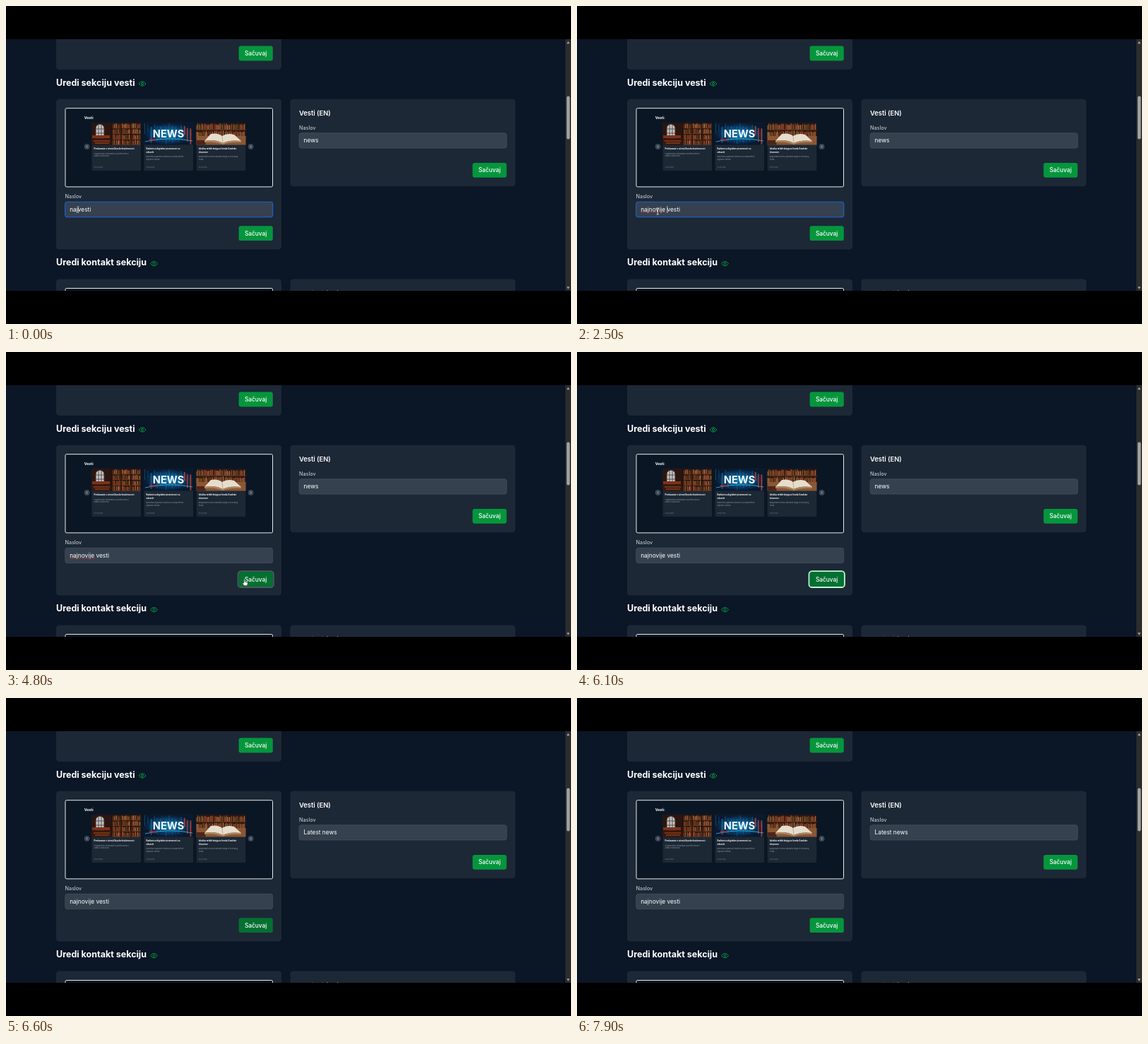
These frames come from a looping animation (800 px wide and 450 px high, 8000 ms). An HTML page:

```html
<!DOCTYPE html>
<html lang="sr">
<head>
<meta charset="utf-8">
<title>Uredi sekciju vesti</title>
<style>
html, body { margin: 0; width: 100%; height: 100%; overflow: hidden; background: #000; }
svg { display: block; width: 100%; height: 100%; font-family: Inter, sans-serif; }
.dark { --page: #0b1626; --card: #1d2836; --field: #35414f; --line: #4b5766; --ink: #fff; --label: #d5d9df; --frame: #e8eaed; }
.light { --page: #ecf3f1; --card: #fbfdfd; --field: #fafcfc; --line: #cdd3d5; --ink: #17202f; --label: #4a5361; --frame: none; }
.page { fill: var(--page); }
.card { fill: var(--card); }
.field { fill: var(--field); stroke: var(--line); stroke-width: .6; }
.ink { fill: var(--ink); }
.label { fill: var(--label); font-size: 7.29px; }
.h2 { fill: var(--ink); font-size: 12.5px; font-weight: 700; }
.h3 { fill: var(--ink); font-size: 9.375px; font-weight: 600; }
.value { fill: var(--ink); font-size: 8.333px; }
.btn { fill: #05963d; }
.btn-text { fill: #fff; font-size: 8.333px; font-weight: 500; text-anchor: middle; }
.shot { fill: #0b1625; stroke: var(--frame); stroke-width: 1; }
.eye { fill: none; stroke: #079540; stroke-width: 1; }
</style>
</head>
<body>
<svg id="stage" viewBox="0 0 800 450" preserveAspectRatio="none"></svg>
<script>
const LOOP = 8000;
const stage = document.getElementById('stage');

const rect = (x, y, w, h, r, attrs = '') =>
  `<rect x="${x}" y="${y}" width="${w}" height="${h}" rx="${r}" ${attrs}/>`;
const text = (x, y, str, attrs = '') => `<text x="${x}" y="${y}" ${attrs}>${str}</text>`;
const path = (d, attrs) => `<path d="${d}" ${attrs}/>`;

function random(seed) {
  return () => (seed = (seed * 16807) % 2147483647) / 2147483647;
}

function button(x, y, id = '') {
  return rect(x, y, 48.2, 20.8, 3.2, `class="btn" ${id && `id="${id}"`}`) +
    text(x + 24.1, y + 13.45, 'Sačuvaj', 'class="btn-text"');
}

function field(x, y, value, id) {
  return rect(x, y, 294, 21.4, 3.4, `class="field" id="${id}Box"`) +
    text(x + 6.5, y + 13.5, value, `class="value" id="${id}"`);
}

function eye(x, y) {
  return `<g class="eye" transform="translate(${x} ${y})">` +
    path('M-5 0Q-2.8 -3.2 0 -3.2T5 0Q2.8 3.2 0 3.2T-5 0Z', '') + '<circle r="1.5"/></g>';
}

// Rows of book spines filling a box
function books(x, y, w, h, rows, seed) {
  const rnd = random(seed), step = h / rows;
  let out = rect(x, y, w, h, 0, 'fill="#2a160d"');
  for (let row = 0; row < rows; row++) {
    for (let bx = x; bx < x + w - 1; bx += 1.5) {
      const tall = step * (.6 + rnd() * .25);
      out += rect(bx, y + (row + 1) * step - tall - .7, 1.2, tall, 0,
        `fill="hsl(${8 + rnd() * 26} ${35 + rnd() * 30}% ${18 + rnd() * 30}%)"`);
    }
    out += rect(x, y + (row + 1) * step - .7, w, .7, 0, 'fill="#7d4a29"');
  }
  return out;
}

function hall() {
  const arch = (x, w, top) => path(
    `M${x} 187V${top + 6}Q${x} ${top + 1} ${x + w / 2} ${top}Q${x + w} ${top + 1} ${x + w} ${top + 6}V187Z`,
    'fill="#bcc5cb" stroke="#512913" stroke-width="1"');
  return rect(121.5, 165.5, 69, 31, 0, 'fill="#2b1510"') + arch(127, 12, 167) +
    path('M131 168V187M135 168V187M127 174H139M127 180H139', 'stroke="#4c3429" stroke-width=".8"') +
    rect(122, 183, 25, 4, 0, 'fill="#7e3218"') +
    rect(121.5, 188, 28, 8.5, 0, 'fill="#39180f"') +
    path('M124 191H147M126 194H146', 'stroke="#b65b22" stroke-width=".9"') +
    books(150, 165.5, 40.5, 31, 4, 71) +
    path('M150 165.5V196.5M163 165.5V196.5M177 165.5V196.5', 'stroke="#1d0e09" stroke-width="1.3"');
}

function studio() {
  const rnd = random(23);
  let out = rect(195.5, 165.5, 69.5, 31, 0, 'fill="url(#glow)"');
  for (let i = 0; i < 16; i++) {
    const warm = i > 12;
    out += rect(196 + i * 4.3, 166 + rnd() * 8, 1 + rnd() * 2, 8 + rnd() * 18, 0,
      `fill="${warm ? '#d0402b' : '#2396c5'}" opacity="${warm ? .85 : .12 + rnd() * .35}"`);
  }
  return out + path('M197 192Q230 184 264 191', 'stroke="#32bfe4" stroke-width=".8" fill="none"') +
    rect(203, 188.5, 10, 2, 0, 'fill="#b0313a"') +
    text(230, 186, 'NEWS', 'font-size="14.5" font-weight="700" fill="#f2fbff" text-anchor="middle"');
}

function reading() {
  return books(269.5, 165.5, 70, 20, 2, 45) +
    rect(269.5, 184, 70, 12.5, 0, 'fill="#8a5735"') +
    rect(269.5, 190, 13, 6.5, 0, 'fill="#4c2517"') +
    path('M281 191L290 181Q300 179 306 184Q313 179 323 182L333 191Q316 189 307 194Q296 188 281 191Z', 'fill="#e7ddcc"') +
    path('M281 191Q296 188 307 194Q316 189 333 191V193Q317 192 307 196Q296 191 281 193Z', 'fill="#a98662"') +
    path('M306 184L307 194', 'stroke="#a89680" stroke-width=".7"');
}

function newsCard(x, picture, title, body, date) {
  const lines = (list, y, gap, attrs) =>
    list.map((line, i) => text(x + 3, y + i * gap, line, attrs)).join('');
  const bodyTop = 204 + title.length * 5 - (title.length > 1 ? .5 : 0);
  return rect(x, 165.5, 69.5, 67.5, 1.2, 'fill="#1d2835"') + picture +
    lines(title, 203.2, 5.2, 'font-size="2.95" font-weight="700" fill="#fff"') +
    lines(body, bodyTop + .6, 3.5, 'font-size="2.4" fill="#929ba7"') +
    text(x + 3, 229.4, date, 'font-size="2.3" fill="#79838f"');
}

function arrow(x, dir) {
  return `<circle cx="${x}" cy="199" r="3.9" fill="#3c4755"/>` +
    path(`M${x - dir * .7} 197.4L${x + dir * .8} 199L${x - dir * .7} 200.6`, 'fill="none" stroke="#dfe3e8" stroke-width=".7"');
}

function preview() {
  return rect(84, 144.7, 293.5, 111.2, 1.8, 'class="shot"') +
    text(110.7, 160, 'Vesti', 'font-size="5.2" font-weight="700" fill="#fff"') +
    newsCard(121.5, hall(), ['Predavanje o istoriji Srpske književnosti'],
      ['Organizujemo predavanje sa profesorima iz', 'oblasti književnosti.'], '20.03.2025') +
    newsCard(195.5, studio(), ['Radionica digitalne pismenosti za', 'odrasle'],
      ['Biblioteka organizuje radionicu za unapređenje', 'digitalnih veština.'], '15.03.2025') +
    newsCard(269.7, reading(), ['Izložba retkih knjiga iz fonda Gradske', 'čitaonice'],
      ['Razgledajte izložbu najstarijih knjiga iz istorijskog', 'fonda.'], '10.03.2025') +
    arrow(114.6, -1) + arrow(346.6, 1);
}

function page() {
  return rect(0, 47, 800, 356, 0, 'class="page"') +
    rect(71, 20, 319, 70, 4.2, 'class="card"') + button(329.6, 56.6) +
    text(71, 112.6, 'Uredi sekciju vesti', 'class="h2"') + eye(193, 110) +
    rect(71, 131.8, 319, 212.8, 4.2, 'class="card"') + preview() +
    text(83.6, 272.4, 'Naslov', 'class="label"') + field(83.7, 277.3, 'najvesti', 'title') +
    path('M90.5 291.9H126', 'id="spell" stroke="#d8402f" stroke-width=".9" stroke-dasharray="1.4 .7"') +
    rect(0, 283, .7, 10, 0, 'id="caret" class="ink"') +
    rect(328.6, 310.3, 50.2, 22.8, 4.2, 'id="ring" fill="none" stroke="#b9f8cf" stroke-width="2"') +
    button(329.6, 311.3, 'save') +
    rect(402.4, 131.8, 318.8, 123.5, 4.2, 'class="card"') +
    text(415, 155, 'Vesti (EN)', 'class="h3"') +
    text(415, 175, 'Naslov', 'class="label"') + field(415, 179.7, 'news', 'titleEn') + button(660.6, 222) +
    text(71, 367.4, 'Uredi kontakt sekciju', 'class="h2"') + eye(209.5, 364.6) +
    rect(71, 386.6, 319, 60, 4.2, 'class="card"') + rect(84, 399.5, 293.5, 60, 1.8, 'class="shot"') +
    rect(402.4, 386.6, 318.8, 60, 4.2, 'class="card"') + text(415, 409.8, 'Kontakt (EN)', 'class="h3"');
}

function modal() {
  return rect(0, 47, 800, 356, 0, 'fill="#000" opacity=".2"') +
    rect(272, 82, 248, 291, 4, 'fill="#24364a" opacity=".55" filter="url(#shadow)"') +
    rect(272.4, 80.4, 247.4, 289.4, 4, 'fill="#cbcccc" stroke="#8c9aa4" stroke-width="1"') +
    path('M273 109.5H519', 'stroke="#c1c4c5" stroke-width=".6"') +
    `<g filter="url(#soften)">` +
    text(396, 97, 'Kako koristiti upravljanje stranicama', 'font-size="9.375" font-weight="600" fill="#1c2532" text-anchor="middle"') +
    path('M500.5 94L506.5 100M506.5 94L500.5 100M292 145L287.5 149.3L292 153.6M500.8 145L505.3 149.3L500.8 153.6',
      'fill="none" stroke="#66717d" stroke-width="1.5"') + '</g>' +
    '<circle cx="396" cy="225" r="2.5" fill="#fff"/><circle cx="763" cy="70" r="12.5" fill="#f0f1f1"/>' +
    path('M758.6 65.6L767.4 74.4M767.4 65.6L758.6 74.4', 'stroke="#111" stroke-width="1.4"');
}

function scrollbar() {
  return rect(792, 47, 8, 356, 0, 'fill="#2b2c2e"') + rect(793.8, 127.5, 4.6, 61, 2.3, 'fill="#a0a1a2"') +
    path('M793.8 53.2L796 49.8L798.2 53.2ZM793.8 397.3L796 400.7L798.2 397.3Z', 'fill="#a0a1a2"');
}

function pointers() {
  const edge = 'fill="#fff" stroke="#111" stroke-width=".6" stroke-linejoin="round"';
  return '<g id="pointer">' +
    path('M-1.6 -4.5H1.6M0 -4.5V4.5M-1.6 4.5H1.6', 'id="beam" stroke="#fff" stroke-width=".7"') +
    path('M0 0V8.6L2 6.8L3.3 9.8L4.7 9.2L3.4 6.3H6Z', `id="arrow" ${edge}`) +
    path('M-.8 .8Q0 -.6 .8 .8V4L4 4.8Q5 5.1 4.8 6.4L4 9.8H-.4L-2.8 6.4Q-2.6 5.1 -.8 6.2Z', `id="hand" ${edge}`) + '</g>';
}

stage.innerHTML = `<defs>
  <clipPath id="view">${rect(0, 47, 800, 356, 0)}</clipPath>
  <radialGradient id="glow"><stop stop-color="#1686b8"/><stop offset=".6" stop-color="#0b3f6d"/><stop offset="1" stop-color="#081930"/></radialGradient>
  <filter id="blur" x="0" y="0" width="1" height="1"><feGaussianBlur stdDeviation=".85"/></filter>
  <filter id="soften"><feGaussianBlur stdDeviation=".3"/></filter>
  <filter id="shadow"><feGaussianBlur stdDeviation="6"/></filter>
</defs>` + rect(0, 0, 800, 450, 0) +
  `<g clip-path="url(#view)"><g id="page">${page()}</g><g id="modal">${modal()}</g>${scrollbar()}${pointers()}</g>`;

const el = {};
for (const node of stage.querySelectorAll('[id]')) el[node.id] = node;

const show = (node, on) => node.setAttribute('display', on ? 'inline' : 'none');
const within = (t, a, b) => t >= a && t < b;
const ramp = (t, a, b) => Math.min(1, Math.max(0, (t - a) / (b - a)));
const smooth = u => u * u * (3 - 2 * u);
const setText = (node, str) => { if (node.textContent !== str) node.textContent = str; };

const KEYS = 'novije ';
const KEY_TIMES = [300, 600, 800, 1000, 1200, 1400, 1500];

function drawField(t) {
  const typed = 'naj' + KEYS.slice(0, KEY_TIMES.filter(k => t >= k).length);
  const focused = t < 4800;
  setText(el.title, typed + 'vesti');
  setText(el.titleEn, t < 6600 ? 'news' : 'Latest news');
  el.titleBox.style.stroke = focused ? '#1c64d8' : '';
  el.titleBox.style.strokeWidth = focused ? 1.1 : '';
  el.caret.setAttribute('x', 90.2 + el.title.getSubStringLength(0, typed.length));
  show(el.caret, t < 2000 || within(t, 2500, 3000) || within(t, 3500, 4000));
  show(el.spell, within(t, 1500, 5800));
}

function drawPointer(t) {
  const u = smooth(ramp(t, 2400, 3200));
  const x = 104 + 233.5 * u, y = 289 + 32 * u;
  const onButton = x >= 329.6, onField = y < 298.7;
  show(el.pointer, within(t, 2400, 5800));
  el.pointer.setAttribute('transform', `translate(${x} ${y})`);
  show(el.beam, onField);
  show(el.arrow, !onField && !onButton);
  show(el.hand, onButton);
}

function drawButton(t) {
  const hover = ramp(t, 3000, 3150) - ramp(t, 6800, 7000);
  const mix = (a, b) => Math.round(a + (b - a) * hover);
  el.save.style.fill = `rgb(${mix(5, 4)} ${mix(150, 112)} ${mix(61, 49)})`;
  show(el.ring, within(t, 4800, 6500));
  el.ring.setAttribute('opacity', ramp(t, 4750, 4950));
}

function draw(t) {
  const reload = within(t, 6500, 6600);
  el.page.setAttribute('class', reload ? 'light' : 'dark');
  el.page.setAttribute('filter', reload ? 'url(#blur)' : 'none');
  show(el.modal, reload);
  drawField(t);
  drawPointer(t);
  drawButton(t);
}

const start = performance.now();
function tick() {
  draw((performance.now() - start) % LOOP);
  requestAnimationFrame(tick);
}
tick();
</script>
</body>
</html>
```
